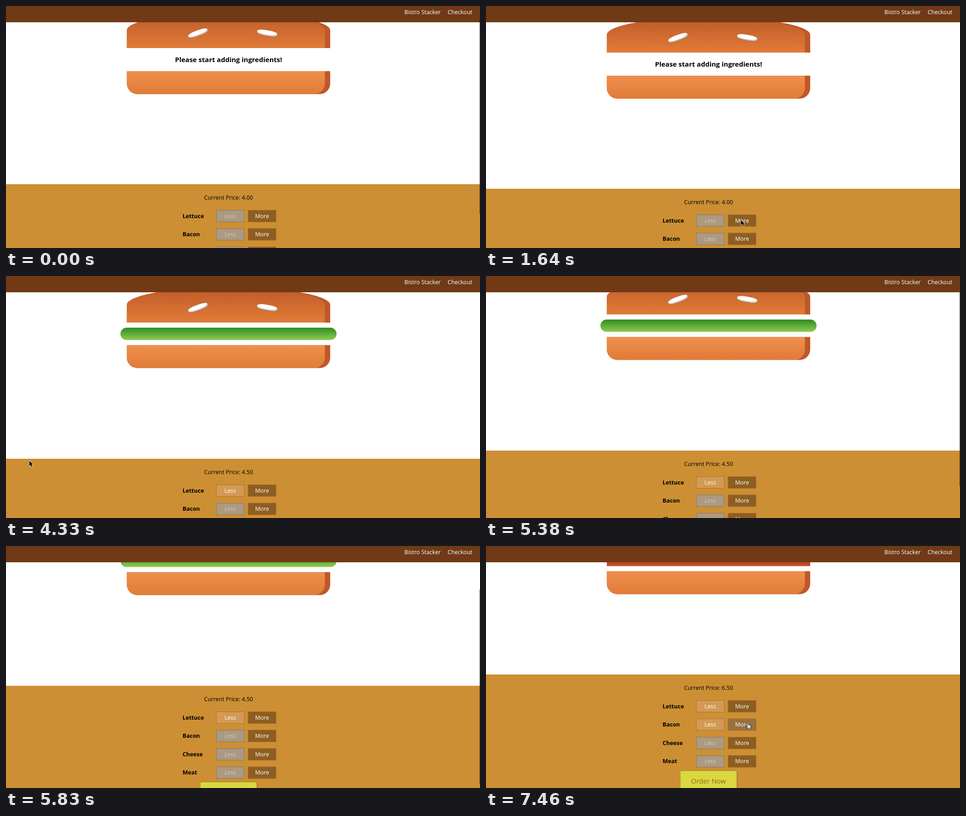
Recreate the animation shown at these times as an HTML page with a canvas. Size 1047x535 px, loop 8 s.

```html
<!DOCTYPE html>
<html lang="en">
<head>
<meta charset="utf-8">
<title>Sandwich order</title>
<style>
  html, body { margin: 0; width: 100%; height: 100%; overflow: hidden; background: #fff; }
  canvas { display: block; }
</style>
</head>
<body>
<canvas id="stage" width="1047" height="535"></canvas>
<script>
const ctx = document.getElementById('stage').getContext('2d');
const W = 1047, H = 535, LOOP = 8000;
const MID = 491.5;            // centre of the page column
const U = 0.78125;            // one CSS pixel of the page on the stage
const BURGER_W = 561.6, BURGER_H = 390.6, GAP = BURGER_W * 0.02;
const MAX_SCROLL = 120;
const FONT = '"Open Sans", "Noto Sans", sans-serif';

// Stepped tracks: time, then values held until the next row
const SCROLL = [[0, 10], [450, 4], [600, 0], [5380, 18], [5530, 50], [5680, 76], [5830, 95],
  [5980, 111], [6130, 121], [6280, 122.5], [6430, 120.5], [6580, 120]];
const BAR = [[0, 0.6], [900, 0.45], [1050, 0.3], [1190, 0.15], [1340, 0], [5380, 0.6],
  [6580, 0.35], [6720, 0.15], [6870, 0]];
const CURSOR = [[0, ''], [900, 'arrow', 52, 412], [1050, 'arrow', 300, 440], [1190, 'arrow', 540, 470],
  [1340, ''], [1640, 'arrow', 562.5, 472.5], [3140, 'hand', 561, 473],
  [4330, 'arrow', 51, 408], [4480, 'arrow', 28, 424], [4630, 'arrow', 10, 442], [4780, 'arrow', -2, 454.5],
  [5080, ''], [6130, 'arrow', 96, 346], [6280, 'arrow', 216, 349], [6430, 'arrow', 372, 366],
  [6580, 'arrow', 510, 383], [6720, 'hand', 570, 391], [6870, 'hand', 574.5, 391]];
const HOVER = [[0, -1], [3140, 0], [4330, -1], [6720, 1]];
const PRICE = [[0, '4.00'], [3590, '4.50'], [7460, '6.50']];

const at = (track, t) => track.filter(row => row[0] <= t).pop().slice(1);

function rect(x, y, w, h, fill, border) {
  ctx.fillStyle = fill;
  ctx.fillRect(x, y, w, h);
  if (!border) return;
  ctx.strokeStyle = border;
  ctx.lineWidth = 0.9;
  ctx.strokeRect(x + 0.45, y + 0.45, w - 0.9, h - 0.9);
}

function text(str, x, y, { size = 12.5, weight = 400, color = '#000', align = 'center' } = {}) {
  ctx.font = `${weight} ${size}px ${FONT}`;
  ctx.textAlign = align;
  ctx.fillStyle = color;
  ctx.fillText(str, x, y);
}

// Rounded box with a vertical gradient and an optional hard inset shadow
function box(x, y, w, h, radii, [top, bottom], inset) {
  const path = (dx, dy) => {
    ctx.beginPath();
    ctx.roundRect(x + dx, y + dy, w, h, radii);
  };
  const grad = ctx.createLinearGradient(0, y, 0, y + h);
  grad.addColorStop(0, top);
  grad.addColorStop(1, bottom);
  ctx.save();
  path(0, 0);
  if (inset) {
    ctx.fillStyle = inset.color;
    ctx.fill();
    ctx.clip();
    path(inset.x * U, inset.y * U);
  }
  ctx.fillStyle = grad;
  ctx.fill();
  ctx.restore();
}

function layer(y, width, height, radii, colors, inset) {
  const w = BURGER_W * width, h = BURGER_H * height;
  box(MID - w / 2, y, w, h, radii, colors, inset);
  return y + h;
}

function seed(x, y, degrees) {
  const w = 44.9, h = 11.7;
  ctx.save();
  ctx.translate(x, y);
  ctx.rotate(degrees * Math.PI / 180);
  box(-w / 2, -h / 2, w, h, { x: w * 0.4, y: h * 0.4 }, ['#fff', '#fff'], { x: -2, y: -3, color: '#c9c9c9' });
  ctx.restore();
}

function burger(y, lettuce, bacon) {
  const crust = { x: -15, y: 0, color: '#bf5829' };
  const dome = { x: BURGER_W * 0.4, y: BURGER_H * 0.1 };
  let next = layer(y, 0.8, 0.2, [dome, dome, 0, 0], ['#bd5a27', '#e17b39'], crust);
  seed(424.1, y + 44.9, -20);
  seed(577, y + 44.9, 10);
  if (lettuce) {
    next = layer(next + GAP, 0.85, 0.07, 20 * U, ['#2f8c1f', '#8fcb54']);
    if (bacon) next = layer(next + GAP, 0.8, 0.03, 0, ['#bd3b1c', '#c45030']);
    next += GAP;
  } else {
    text('Please start adding ingredients!', MID, Math.round(next + 31), { size: 15, weight: 700 });
    next += 51;
  }
  layer(next, 0.8, 0.13, [0, 0, 30 * U, 30 * U], ['#ef8f4d', '#e17b37'], crust);
}

function controls(y, price, counts, hover) {
  rect(0, y, W, H - y + 10, '#cd8f33');
  text('Current Price: ' + price, MID, y + 33.5);
  ['Lettuce', 'Bacon', 'Cheese', 'Meat'].forEach((name, i) => {
    const top = y + 57 + 40.6 * i, base = Math.round(top + 17.6);
    text(name, 390, base, { weight: 700, align: 'left' });
    const on = counts[i];
    rect(464, top, 62.5, 26.6, on ? '#d39a55' : '#ac9980', on ? '#aa6a22' : '#7e7365');
    text('Less', 495.2, base, { color: on ? '#fff' : '#ccc' });
    rect(534.5, top, 62.5, 26.6, hover === i ? '#99703f' : '#8d5e22', '#a96a22');
    text('More', 565.6, base, { color: '#fff' });
  });
  ctx.save();
  ctx.shadowColor = '#966909';
  ctx.shadowBlur = 1.6;
  ctx.shadowOffsetX = ctx.shadowOffsetY = 1.6;
  rect(428.5, y + 212.3, 126, 46, '#dad741');
  ctx.restore();
  rect(428.5, y + 212.3, 126, 46, '#dad741', '#966919');
  text('Order Now', MID, y + 241, { size: 15, color: '#966919' });
}

function toolbar(y) {
  rect(0, y - 10, W, 46, '#703a17');
  text('Bistro Stacker', 960, y + 17.7, { color: '#fff', align: 'right' });
  text('Checkout', 1030, y + 17.7, { color: '#fff', align: 'right' });
}

function scrollbar(scroll, alpha) {
  if (!alpha) return;
  rect(1046, 22 + 0.777 * Math.min(scroll, MAX_SCROLL), 1, 430, `rgba(0,0,0,${alpha})`);
}

const POINTERS = {
  arrow: new Path2D('M.6 .6V12.2L3.3 9.8L5.1 14.1L7.1 13.2L5.3 9.1H8.9Z'),
  hand: new Path2D('M2 1.2Q3.2 .4 3.9 1.8L5.1 4.9Q6.2 4.2 7 5.1Q8.2 4.6 8.8 5.6Q10.2 5.3 10.6 6.8' +
    'Q11.5 9.6 10.6 11.6L10.3 13.2H5L3.8 11.5L.8 8.6Q.3 7.2 1.7 7.2L3.4 8.2L1.5 2.6Q1.3 1.7 2 1.2Z')
};

function pointer(kind, x, y) {
  if (!kind) return;
  const arrow = kind === 'arrow';
  ctx.save();
  ctx.translate(x, y);
  ctx.lineJoin = 'round';
  ctx.lineWidth = arrow ? 1.5 : 1;
  ctx.strokeStyle = arrow ? '#fff' : '#000';
  ctx.fillStyle = arrow ? '#000' : '#fff';
  if (arrow) {
    ctx.stroke(POINTERS.arrow);
    ctx.fill(POINTERS.arrow);
  } else {
    ctx.fill(POINTERS.hand);
    ctx.stroke(POINTERS.hand);
    ctx.beginPath();
    for (const px of [5.8, 7.4, 9]) {
      ctx.moveTo(px, 8.6);
      ctx.lineTo(px + 0.2, 11.2);
    }
    ctx.lineWidth = 0.6;
    ctx.stroke();
  }
  ctx.restore();
}

function draw(t) {
  const [scroll] = at(SCROLL, t);
  const lettuce = t >= 3590, bacon = t >= 7460;
  rect(0, 0, W, H, '#fff');
  burger(24.9 - scroll, lettuce, bacon);
  controls(404 - scroll, at(PRICE, t)[0], [lettuce, bacon], at(HOVER, t)[0]);
  toolbar(Math.min(0, MAX_SCROLL - scroll));
  scrollbar(scroll, at(BAR, t)[0]);
  pointer(...at(CURSOR, t));
}

const start = performance.now();
function tick() {
  draw((performance.now() - start) % LOOP);
  requestAnimationFrame(tick);
}
tick();
</script>
</body>
</html>
```
